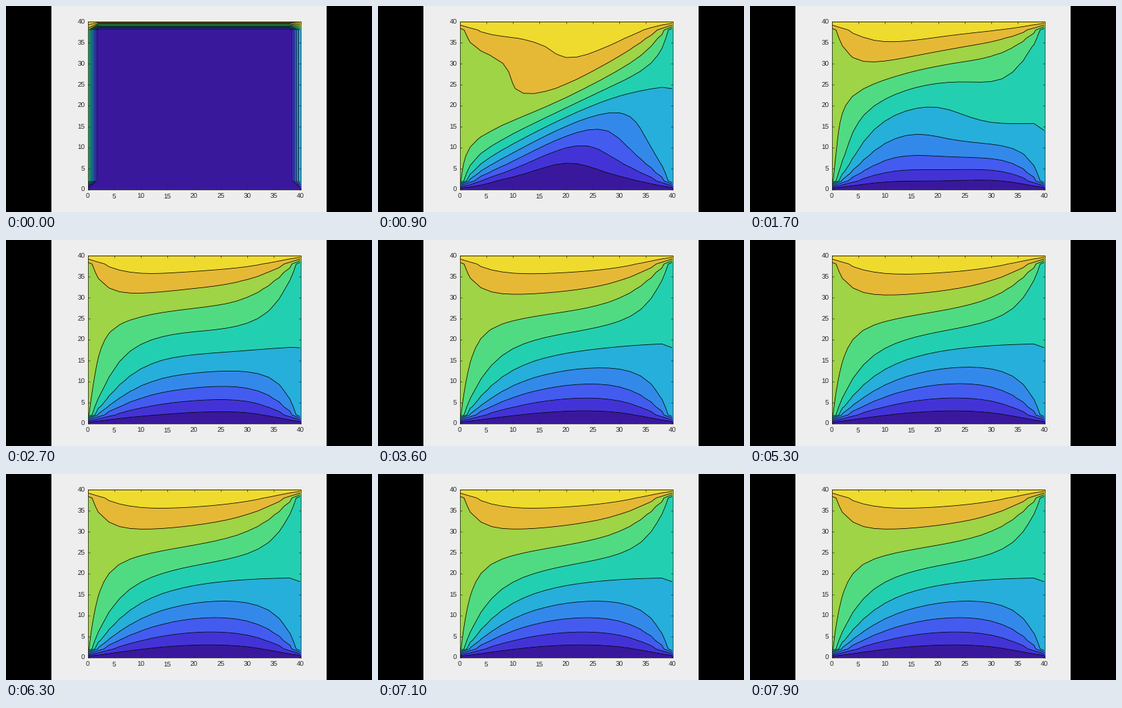
These frames come from a looping animation (540 px wide and 304 px high, 8000 ms). A matplotlib script:

```python
import matplotlib.pyplot as plt
import numpy as np
from matplotlib.animation import FuncAnimation
from matplotlib.colors import LinearSegmentedColormap
from matplotlib.patches import Rectangle

# A 40 x 40 cm plate warming up, stepped by alternating-direction line solves
# that reuse the lines already updated in the same pass.
WIDTH, HEIGHT, DPI = 540, 304, 100
FRAMES, INTERVAL = 80, 100
SIDE, SPACING = 40, 2
DIFFUSIVITY, TIME_STEP = 0.835, 10
RATIO = DIFFUSIVITY * TIME_STEP / SPACING ** 2
NODES = SIDE // SPACING + 1
EPS = 1e-6
INK = "#262626"
PX = 72 / DPI

PALETTE = LinearSegmentedColormap.from_list("plate", [
    "#3a189c", "#4333d6", "#445bf0", "#3389ea", "#26afda", "#23cfb1",
    "#50db83", "#9ed445", "#e5b936", "#efda2e", "#f4ff1a"], N=1024)

# Ticks at which the solver has not finished another step.
HOLDS = {1, 2, 6, 12, 16, 19, 68, 69, 76}

# Temperatures at a few nodes (x, y), keyed by step; they settle which
# direction is solved first.
READINGS = {
    6: {(8, 22): 80, (20, 34): 101, (34, 26): 51, (28, 8): 0, (24, 6): -10},
    12: {(10, 28): 70, (22, 26): 80, (14, 22): 70, (18, 16): 70, (32, 14): 40},
}

inner = NODES - 2
LINE_SOLVE = np.linalg.inv(2 * (1 + RATIO) * np.eye(inner)
                           - RATIO * (np.eye(inner, k=1) + np.eye(inner, k=-1)))


def half_step(u):
    """Solve each column implicitly, left to right and in place."""
    for j in range(1, NODES - 1):
        rhs = RATIO * (u[1:-1, j - 1] + u[1:-1, j + 1]) + 2 * (1 - RATIO) * u[1:-1, j]
        rhs[0] += RATIO * u[0, j]
        rhs[-1] += RATIO * u[-1, j]
        u[1:-1, j] = LINE_SOLVE @ rhs


def simulate(steps, columns_first):
    """Fields after every step; row 0 is the top edge."""
    u = np.zeros((NODES, NODES))
    u[:, 0], u[:, -1] = 75, 50
    u[0], u[-1] = 100, 0
    history = [u.copy()]
    for _ in range(steps):
        for field in (u, u.T) if columns_first else (u.T, u):
            half_step(field)
        history.append(u.copy())
    return history


def misfit(history):
    return sum(abs(history[step][(SIDE - y) // SPACING, x // SPACING] - value)
               for step, nodes in READINGS.items()
               for (x, y), value in nodes.items())


step_at = np.cumsum([t > 0 and t not in HOLDS for t in range(FRAMES)])
fields = min((simulate(step_at[-1], order) for order in (True, False)), key=misfit)

plt.rcParams.update({"font.family": "Liberation Sans", "text.hinting": "none"})
fig = plt.figure(figsize=(WIDTH / DPI, HEIGHT / DPI), dpi=DPI, facecolor="black")
fig.add_artist(Rectangle((67 / WIDTH, 0), 406 / WIDTH, 1,
                         transform=fig.transFigure, color="#eeeeee", lw=0, zorder=-1))
ax = fig.add_axes([120.5 / WIDTH, 33.5 / HEIGHT, 314 / WIDTH, 247.5 / HEIGHT])
ax.set(xlim=(0, SIDE), ylim=(0, SIDE),
       xticks=range(0, SIDE + 1, 5), yticks=range(0, SIDE + 1, 5))
ax.set_axisbelow(False)
ax.tick_params(direction="in", top=True, right=True, length=3 * PX, width=0.7 * PX,
               color=INK, labelcolor=INK, labelsize=10 * PX, pad=4 * PX)
ax.tick_params(axis="x", pad=6 * PX)
for spine in ax.spines.values():
    spine.set(color=INK, linewidth=0.8 * PX)

grid = np.arange(NODES) * SPACING
# Keeps isotherms that run along an edge from thickening the frame.
inset = Rectangle((0.06, 0.06), SIDE - 0.12, SIDE - 0.12, transform=ax.transData)
drawn = []


def draw(tick):
    while drawn:
        drawn.pop().remove()
    u = fields[step_at[tick]][::-1]
    gap = 10 if np.ptp(u) < 122 else 20
    low, high = (np.floor(v / gap) * gap for v in (u.min(), u.max()))
    levels = np.arange(low, high + 1.5 * gap, gap)
    colors = PALETTE((levels[:-1] - low) / (high - low))
    drawn.append(ax.contourf(grid, grid, u, levels=levels - EPS, colors=colors))
    lines = ax.contour(grid, grid, u, levels=levels[1:-1] - EPS, colors="black",
                       linewidths=0.8 * PX, linestyles="solid")
    lines.set_clip_path(inset)
    drawn.append(lines)
    return drawn


anim = FuncAnimation(fig, draw, frames=FRAMES, interval=INTERVAL,
                     init_func=lambda: draw(0), repeat=True, repeat_delay=0)
plt.show()
```
